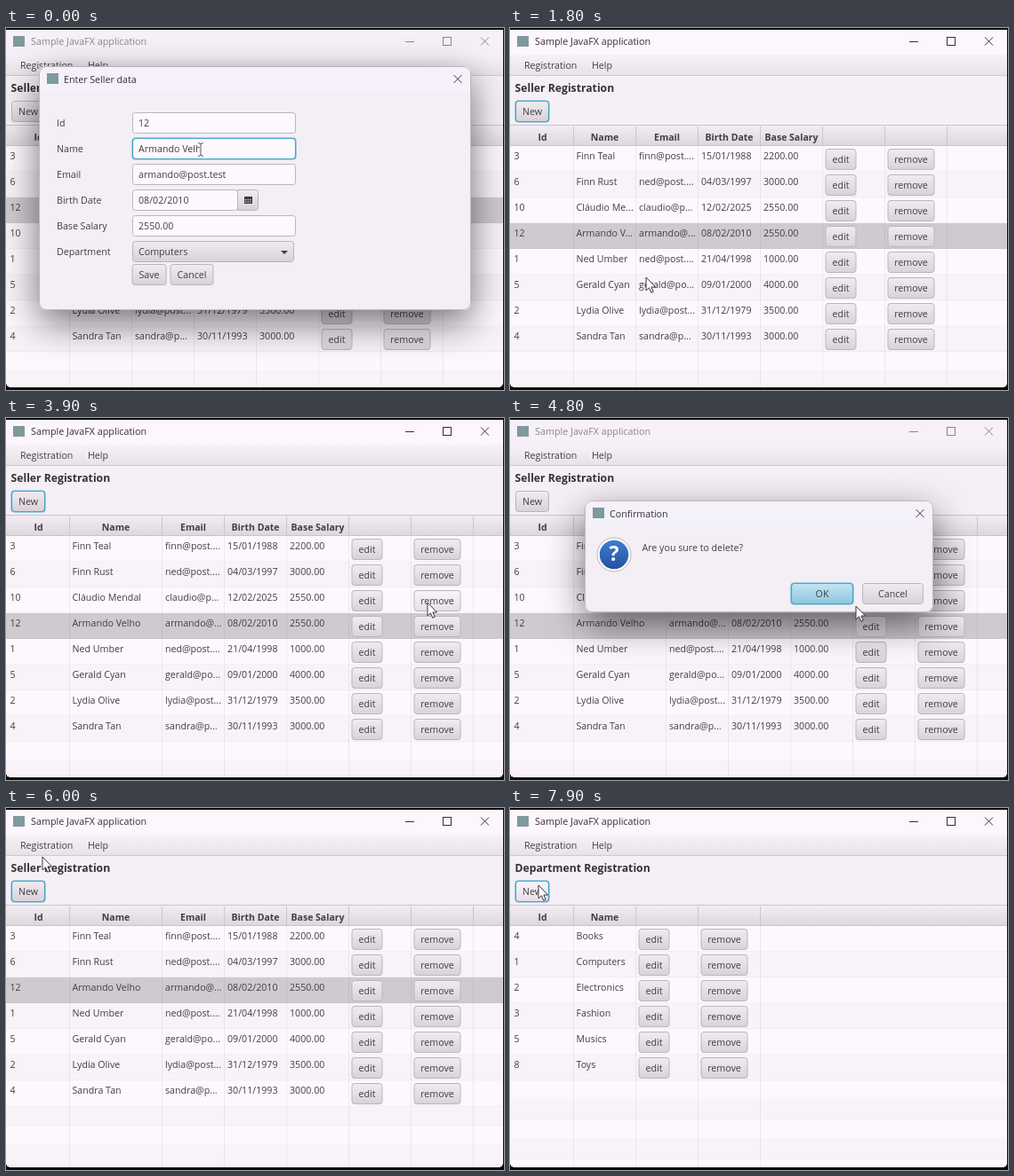
An HTML page with a canvas for the animation above (8 s loop, 560 px wide and 408 px high).

```html
<!DOCTYPE html>
<html lang="en">
<head>
<meta charset="utf-8">
<style>
html, body { margin: 0; width: 560px; height: 408px; overflow: hidden; background: #0b090b; }
canvas { display: block; }
</style>
</head>
<body>
<canvas id="stage" width="560" height="408"></canvas>
<script>
const c = document.getElementById('stage').getContext('2d');
const LOOP = 8000, ROW = 29, TOP = 133, BOTTOM = 405;
const INK = '#423e43', LINE = '#bcb5bc', BLUE = '#1c93c4';
const FONT = '"Open Sans", "Noto Sans", sans-serif';

const sellers = {
  3: ['Finn Teal', 'finn', '15/01/1988', '2200.00'],
  6: ['Finn Rust', 'ned', '04/03/1997', '3000.00'],
  10: ['Cláudio Mendal', 'claudio', '12/02/2025', '2550.00'],
  12: ['Armando Velho', 'armando', '08/02/2010', '2550.00'],
  1: ['Ned Umber', 'ned', '21/04/1998', '1000.00'],
  5: ['Gerald Cyan', 'gerald', '09/01/2000', '4000.00'],
  2: ['Lydia Olive', 'lydia', '31/12/1979', '3500.00'],
  4: ['Sandra Tan', 'sandra', '30/11/1993', '3000.00']
};
const departments = [[4, 'Books'], [1, 'Computers'], [2, 'Electronics'], [3, 'Fashion'], [5, 'Musics'], [8, 'Toys']];

// Pointer stops: time, x, y
const stops = [
  [0, 219, 137], [700, 219, 137], [1100, 172, 262], [1300, 157, 290], [1500, 153, 281],
  [2300, 153, 281], [2700, 141, 122], [3200, 175.5, 122], [3300, 175.5, 122], [3900, 474, 208],
  [4400, 474, 208], [4800, 389, 212], [5100, 352, 201], [5400, 352, 201], [5900, 41, 55],
  [6100, 41, 55], [6300, 42, 44], [6500, 42, 44], [6900, 45, 93], [7200, 45, 93], [7500, 32, 87], [LOOP, 32, 87]
];
let mouse = { x: 0, y: 0 };

const clamp = v => Math.max(0, Math.min(1, v));
const ease = v => { v = clamp(v); return v * v * (3 - 2 * v); };

function pointerAt(t) {
  const i = stops.findIndex(s => s[0] > t);
  const [t0, x0, y0] = stops[i - 1], [t1, x1, y1] = stops[i];
  const k = ease((t - t0) / (t1 - t0));
  return { x: x0 + (x1 - x0) * k, y: y0 + (y1 - y0) * k };
}

function rect(x, y, w, h, fill) {
  c.fillStyle = fill;
  c.fillRect(x, y, w, h);
}

function shade(y, h, from, to) {
  const g = c.createLinearGradient(0, y, 0, y + h);
  g.addColorStop(0, from);
  g.addColorStop(1, to);
  return g;
}

function round(x, y, w, h, r, fill, stroke, width = 1) {
  c.beginPath();
  c.roundRect(x, y, w, h, r);
  if (fill) { c.fillStyle = fill; c.fill(); }
  if (stroke) { c.strokeStyle = stroke; c.lineWidth = width; c.stroke(); }
}

function path(points, stroke, width = 1, fill) {
  c.beginPath();
  points.forEach(([x, y]) => c.lineTo(x, y));
  if (fill) { c.closePath(); c.fillStyle = fill; c.fill(); }
  if (stroke) { c.strokeStyle = stroke; c.lineWidth = width; c.stroke(); }
}

// y is the middle of the capitals
function text(s, x, y, { color = INK, size = 10.65, weight = 400, align = 'left' } = {}) {
  c.font = `${weight} ${size}px ${FONT}`;
  c.textAlign = align;
  c.fillStyle = color;
  c.fillText(s, x, y + 4);
}

function ellipsize(s, room) {
  c.font = `400 10.65px ${FONT}`;
  if (c.measureText(s).width <= room) return s;
  while (c.measureText(s + '...').width > room) s = s.slice(0, -1);
  return s + '...';
}

function focusRing(x, y, w, h) {
  round(x - .5, y - .5, w + 1, h + 1, 4, null, 'rgba(120,195,220,.6)');
  round(x + .5, y + .5, w - 1, h - 1, 3, null, '#45a6c7', 1.2);
}

function button(label, x, y, w, { focus, primary, pressed } = {}) {
  const h = 24, hover = mouse.x >= x && mouse.x < x + w && mouse.y >= y && mouse.y < y + h;
  const [from, to] = primary ? ['#c3e6f3', '#8ec6dd'] : pressed ? ['#cfc8cf', '#dcd5dc']
    : hover ? ['#fbf5fb', '#e6dfe6'] : ['#f2ebf2', '#d8d1d8'];
  round(x + .5, y + .5, w - 1, h - 1, 3, shade(y, h, from, to), LINE);
  if (focus) focusRing(x, y, w, h);
  text(label, x + w / 2, y + 12, { align: 'center' });
}

function field(value, y, w = 184, focus = false) {
  round(142.5, y - 11.5, w - 1, 23, 3, '#fdf8fd', LINE);
  if (focus) focusRing(142, y - 12, w, 24);
  text(value, 149, y);
}

function cross(x, y, color) {
  path([[x - 4.5, y - 4.5], [x + 4.5, y + 4.5]], color);
  path([[x + 4.5, y - 4.5], [x - 4.5, y + 4.5]], color);
}

const appIcon = (x, y) => rect(x, y, 13, 12, '#7d9a9d');

function windowFrame(active, title, menu) {
  rect(0, 0, 560, 408, active ? '#fdf6fc' : '#f7f0f8');
  const ink = active ? '#353135' : '#8c868c';
  appIcon(8, 9);
  text('Sample JavaFX application', 28, 15, { color: ink, size: 10.75 });
  path([[449, 15.5], [459, 15.5]], ink);
  c.strokeRect(491.5, 10.5, 9, 9);
  cross(538.5, 15, ink);
  rect(0, 30, 560, 24, shade(30, 24, '#f8f1f7', '#e8e1e8'));
  rect(0, 53, 560, 1, '#cfc8cf');
  rect(0, 54, 560, 56, '#f6eff6');
  if (menu) rect(8, 31, 75, 23, BLUE);
  text('Registration', 16, 42, { color: menu ? '#fff' : INK });
  text('Help', 92, 42);
  text(title, 5.5, 68, { size: 12.2, weight: 700, color: '#353135' });
}

function table(columns, rows, selected, drawRow) {
  const count = rows.length;
  rect(0, 110, 560, 23, shade(110, 23, '#f3ecf3', '#ddd6dd'));
  rect(0, 109, 560, 1, '#cac3ca');
  rect(0, 132, 560, 1, '#cac3ca');
  for (let i = 0, y = TOP; y < BOTTOM; i++) {
    const h = i < count ? ROW : 22.3;
    rect(0, y, 560, h, i < count && rows[i] === selected ? '#d0c9d0' : i % 2 ? '#f9f2f9' : '#fdf8fd');
    rect(0, y + h - 1, 560, 1, 'rgba(120,100,120,.05)');
    y += h;
  }
  let left = 1;
  for (const { label, right } of columns) {
    rect(right, 111, 1, 21, '#ccc5cc');
    rect(right, TOP, 1, BOTTOM - TOP, 'rgba(120,100,120,.1)');
    text(label, (left + right) / 2 + .5, 123, { size: 10.5, weight: 700, align: 'center' });
    left = right;
  }
  rows.forEach((row, i) => drawRow(row, TOP + i * ROW));
}

function rowButtons(x, y, focus) {
  button('edit', x + 3.5, y + 3, 35);
  button('remove', x + 73.5, y + 3, 53, { focus });
}

function sellerTable(t) {
  const ids = t < 1600 ? [3, 6, 12, 10, 1, 5, 2, 4] : t < 5500 ? [3, 6, 10, 12, 1, 5, 2, 4] : [3, 6, 12, 1, 5, 2, 4];
  const mid = Math.round(141 + 34.4 * ease((t - 2700) / 500));
  const labels = ['Id', 'Name', 'Email', 'Birth Date', 'Base Salary', '', ''];
  const columns = labels.map((label, i) => ({ label, right: i ? mid + (i - 1) * 70 : 71 }));
  table(columns, ids, 12, (id, y) => {
    const [name, user, born, salary] = sellers[id], mark = y + 11;
    text(id, 4.5, mark);
    text(ellipsize(name, mid - 74), 74.5, mark);
    text(ellipsize(user + '@post.test', 64), mid + 4, mark);
    text(born, mid + 74, mark);
    text(salary, mid + 144, mark);
    rowButtons(mid + 210, y, id === 10 && t >= 4100 && t < 4400);
  });
}

function departmentTable() {
  const columns = ['Id', 'Name', '', ''].map((label, i) => ({ label, right: 71 + i * 70 }));
  table(columns, departments, null, ([id, name], y) => {
    text(id, 4.5, y + 11);
    text(name, 74.5, y + 11);
    rowButtons(141, y);
  });
}

function dialogFrame(x, y, w, h, title) {
  c.save();
  c.shadowColor = 'rgba(0,0,0,.55)';
  c.shadowBlur = 42;
  c.shadowOffsetY = 14;
  round(x, y, w, h, 8, '#f4eef5');
  c.restore();
  round(x, y, w, 30, [8, 8, 0, 0], '#f5f1fa');
  round(x + .5, y + .5, w - 1, h - 1, 8, null, '#bdb6be');
  appIcon(x + 9, y + 8);
  text(title, x + 28, y + 15, { color: '#353135' });
  cross(x + w - 15, y + 14.5, '#3a373a');
}

function sellerForm(t) {
  dialogFrame(37, 43, 486, 275, 'Enter Seller data');
  ['Id', 'Name', 'Email', 'Birth Date', 'Base Salary', 'Department']
    .forEach((label, i) => text(label, 57, 107 + i * 29));
  const saving = t >= 1400;
  field('12', 107);
  field(t < 200 ? 'Armando Velh' : 'Armando Velho', 136, 184, !saving);
  field('armando@post.test', 165);
  field('08/02/2010', 194, 119);
  round(260.5, 182.5, 23, 23, [0, 3, 3, 0], shade(182, 23, '#f2ebf2', '#d8d1d8'), LINE);
  rect(268, 190, 9, 8, '#3c393c');
  for (let i = 0; i < 6; i++) rect(269 + i % 3 * 2.6, 193 + (i / 3 | 0) * 2.4, 1.4, 1.2, '#e6dfe6');
  field('2550.00', 223);
  round(142.5, 240.5, 181, 23, 3, shade(240, 23, '#f2ebf2', '#d8d1d8'), LINE);
  text('Computers', 149, 252);
  path([[309, 251], [317, 251], [313, 255]], null, 1, INK);
  button('Save', 141.5, 266, 39, { focus: saving, pressed: saving });
  button('Cancel', 184.5, 266, 49);
}

function confirmation() {
  dialogFrame(84, 93, 392, 126, 'Confirmation');
  c.beginPath();
  c.arc(117, 154, 17.5, 0, 7);
  c.fillStyle = shade(136, 36, '#3f7fd2', '#234f9f');
  c.fill();
  c.lineWidth = 2.5;
  c.strokeStyle = '#fff';
  c.stroke();
  c.beginPath();
  c.arc(117, 154, 19, 0, 7);
  c.lineWidth = .8;
  c.strokeStyle = '#a9a6b2';
  c.stroke();
  text('?', 117, 157, { color: '#fff', size: 23, weight: 700, align: 'center' });
  text('Are you sure to delete?', 148.5, 146);
  button('OK', 316, 186, 70, { primary: true, focus: true });
  button('Cancel', 396, 186, 69);
}

function menuPopup() {
  c.save();
  c.shadowColor = 'rgba(0,0,0,.45)';
  c.shadowBlur = 8;
  c.shadowOffsetY = 2;
  rect(8, 54, 77, 53, '#f6f0f6');
  c.restore();
  ['Seller', 'Department'].forEach((label, i) => {
    const y = 57 + i * 24, on = mouse.y >= y && mouse.y < y + 24;
    if (on) rect(9, y, 75, 24, BLUE);
    text(label, 13.5, y + 12, { color: on ? '#fff' : INK });
  });
}

function pointer(t) {
  const { x, y } = mouse;
  const draw = (points, ...style) => path(points.map(([a, b]) => [x + a, y + b]), ...style);
  if (t < 1100 && y < 148) {
    for (const [color, width] of [['#fff', 2.5], ['#555', 1]]) {
      draw([[-3, -7.5], [0, -6.5], [3, -7.5]], color, width);
      draw([[0, -6.5], [0, 6.5]], color, width);
      draw([[-3, 7.5], [0, 6.5], [3, 7.5]], color, width);
    }
  } else if (t >= 2700 && t <= 3300) {
    draw([[-9, 0], [-5, -4], [-5, -1], [5, -1], [5, -4], [9, 0], [5, 4], [5, 1], [-5, 1], [-5, 4], [-9, 0]], '#333', 1, '#fff');
  } else {
    draw([[0, 0], [0, 15], [3.5, 11.8], [5.8, 17.3], [8.2, 16.2], [5.9, 11], [10.6, 11], [0, 0]], '#3a373a', 1, '#fff');
  }
}

function faded(alpha, draw) {
  if (alpha <= 0) return;
  c.globalAlpha = alpha;
  draw();
  c.globalAlpha = 1;
}

function render(t) {
  mouse = pointerAt(t);
  const form = t < 1600 ? 1 : t < 1700 ? .4 : 0;
  const confirm = t < 4400 || t >= 5500 ? 0 : t < 4500 ? .6 : t < 5400 ? 1 : .4;
  const onDepartments = t >= 7200, menuOpen = t >= 6400 && !onDepartments;
  const menuLit = t >= 6200 && !onDepartments && mouse.y < 54 || menuOpen;
  windowFrame(form < 1 && confirm < 1, `${onDepartments ? 'Department' : 'Seller'} Registration`, menuLit);
  button('New', 6, 82, 38, { focus: t >= 1600 && (t < 4100 || t >= 5500) });
  if (onDepartments) departmentTable(); else sellerTable(t);
  faded(form, () => sellerForm(t));
  faded(confirm, confirmation);
  if (menuOpen) menuPopup();
  pointer(t);
}

function tick() {
  render(Math.floor(performance.now() % LOOP / 100) * 100);
  requestAnimationFrame(tick);
}

// Everything stays inside the rounded application window
c.beginPath();
c.roundRect(0, 2, 559, BOTTOM - 2, [0, 0, 6, 6]);
c.clip();
tick();
</script>
</body>
</html>
```
